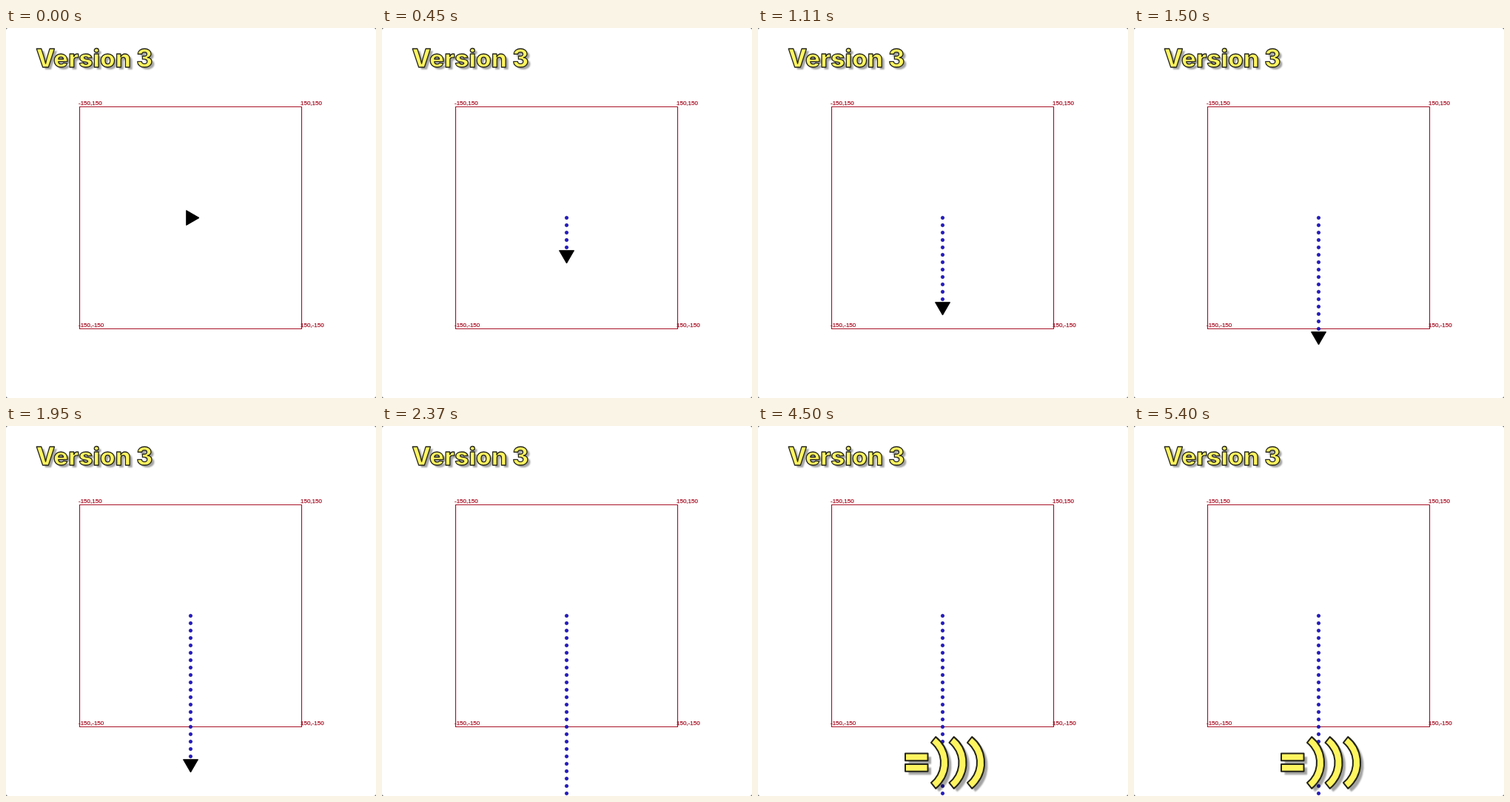
Recreate the animation shown at these times as an HTML page with a canvas. Size 500 px wide and 500 px high, loop 5430 ms.

```html
<!DOCTYPE html>
<html lang="en">
<head>
<meta charset="utf-8">
<title>Version 3</title>
<style>
  html, body { margin: 0; width: 100%; height: 100%; overflow: hidden; background: #fff; }
  canvas { display: block; width: 500px; height: 500px; }
</style>
</head>
<body>
<canvas id="stage" width="500" height="500" aria-label="Version 3 =)))"></canvas>
<script>
const ctx = document.getElementById('stage').getContext('2d');
const LOOP = 5430, TICK = 30;
const HOME = { x: 249.5, y: 256.5 };
const STEP = 10, FIRST_STEP = 42, STEP_TIME = 97, LAST_STEP = 25;
const FADE = { from: 2460, to: 3300 };
const RED = '#a81428', YELLOW = '#fff560', INK = '#24241a';

function drawWindow() {
  ctx.fillStyle = '#fff';
  ctx.fillRect(0, 0, 500, 500);
  // rounded window corners
  ctx.fillStyle = '#555';
  ctx.beginPath();
  ctx.rect(0, 0, 500, 500);
  ctx.roundRect(0, 0, 500, 500, 3);
  ctx.fill('evenodd');
}

function drawSquare() {
  ctx.strokeStyle = ctx.fillStyle = RED;
  ctx.lineWidth = 1.2;
  ctx.strokeRect(99.5, 106.5, 300, 300);
  ctx.font = '8px "Liberation Sans", Arial, sans-serif';
  ctx.lineWidth = 0.25;
  for (const x of [-150, 150]) {
    for (const y of [-150, 150]) {
      const label = `${x},${y}`;
      ctx.fillText(label, x + 248, 254 - y);
      ctx.strokeText(label, x + 248, 254 - y);
    }
  }
}

function drawDots(count) {
  ctx.fillStyle = '#2419cc';
  ctx.strokeStyle = '#15106e';
  ctx.lineWidth = 0.6;
  for (let i = 0; i < count; i++) {
    ctx.beginPath();
    ctx.arc(HOME.x, HOME.y + i * STEP, 2.2, 0, 2 * Math.PI);
    ctx.fill();
    ctx.stroke();
  }
}

function drawArrow(y, angle) {
  ctx.save();
  ctx.translate(HOME.x, y);
  ctx.rotate(angle);
  ctx.beginPath();
  ctx.moveTo(11.55, 0);
  ctx.lineTo(-5.77, -10);
  ctx.lineTo(-5.77, 10);
  ctx.closePath();
  ctx.fillStyle = ctx.strokeStyle = '#000';
  ctx.lineWidth = 1;
  ctx.fill();
  ctx.stroke();
  ctx.restore();
}

// Yellow fill with a soft drop shadow and a dark outline
function paintCaption(fill, stroke, outline, drop) {
  ctx.fillStyle = YELLOW;
  ctx.shadowColor = 'rgba(0,0,0,0.36)';
  ctx.shadowBlur = 2;
  ctx.shadowOffsetX = ctx.shadowOffsetY = drop;
  fill();
  ctx.shadowColor = 'transparent';
  ctx.strokeStyle = INK;
  ctx.lineWidth = outline;
  ctx.lineJoin = 'round';
  stroke();
}

function drawTitle() {
  const text = 'Version 3', x = 40.5, y = 52.5;
  ctx.font = '800 33.5px Inter, "Open Sans", sans-serif';
  paintCaption(() => ctx.fillText(text, x, y), () => ctx.strokeText(text, x, y), 1.3, 3.5);
}

function drawSmile(alpha) {
  const shape = new Path2D();
  for (const y of [442.5, 457]) shape.rect(199, y, 30.5, 9.7);
  const bend = 0.9;
  for (let i = 0; i < 3; i++) {
    const x = 212.5 + i * 24.5;
    const paren = new Path2D();
    paren.arc(x, 455, 44.5, -bend, bend);
    paren.arc(x, 455, 34.5, bend, -bend, true);
    paren.closePath();
    shape.addPath(paren);
  }
  ctx.globalAlpha = alpha;
  paintCaption(() => ctx.fill(shape), () => ctx.stroke(shape), 2, 4.5);
  ctx.globalAlpha = 1;
}

function render(time) {
  const t = Math.floor(time / TICK) * TICK;
  const steps = t < FIRST_STEP ? 0
    : Math.min(LAST_STEP, 1 + Math.floor((t - FIRST_STEP) / STEP_TIME));

  drawWindow();
  drawSquare();
  drawDots(steps);
  if (steps < LAST_STEP) drawArrow(HOME.y + steps * STEP, t < TICK ? 0 : Math.PI / 2);
  drawTitle();

  const alpha = Math.min(1, (t - FADE.from) / (FADE.to - FADE.from));
  if (alpha > 0) drawSmile(alpha);
}

const start = performance.now();
function loop() {
  render((performance.now() - start) % LOOP);
  requestAnimationFrame(loop);
}
loop();
</script>
</body>
</html>
```
